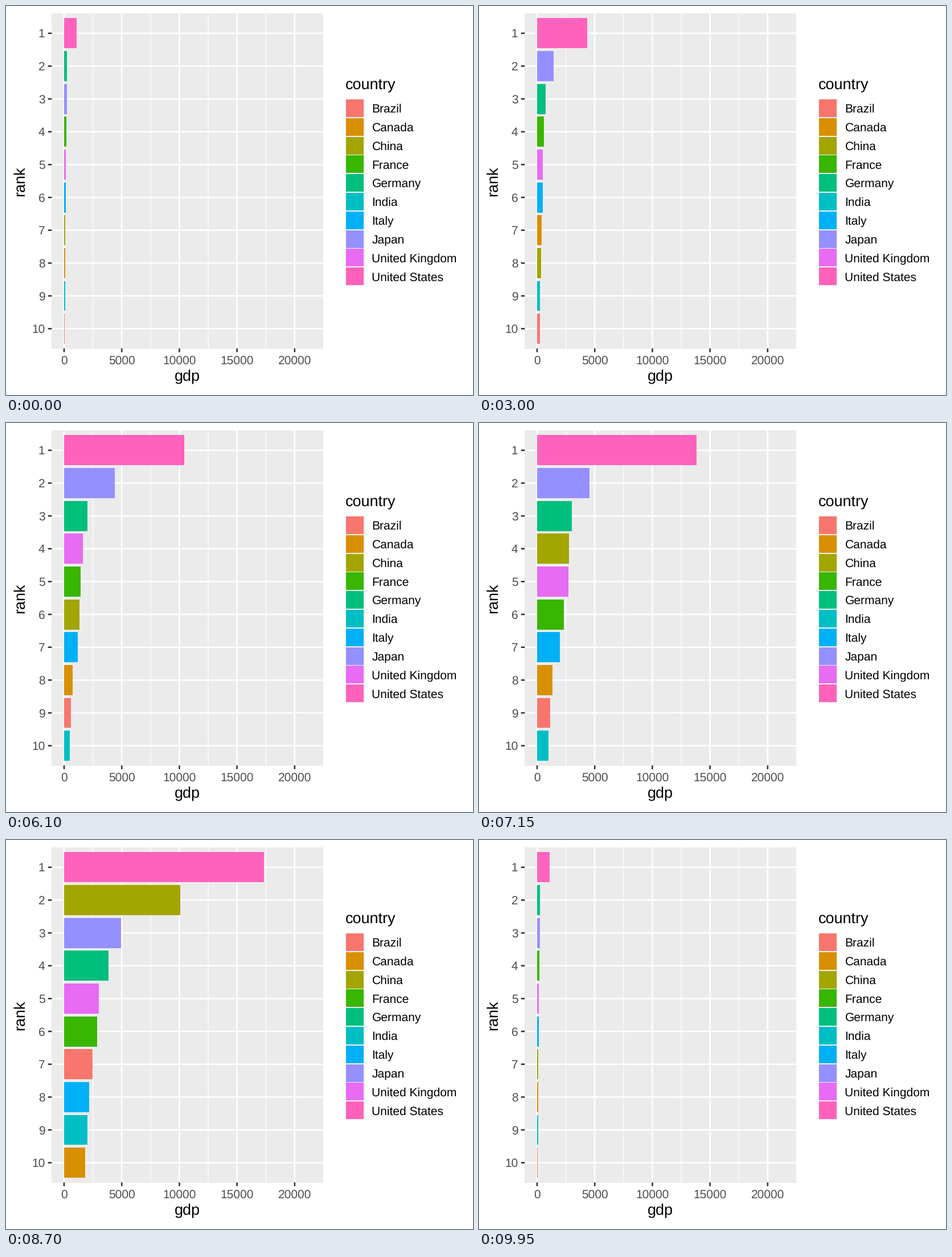
These frames come from a looping animation (820x683 px, 10 s). A matplotlib script:

```python
import matplotlib.pyplot as plt
import numpy as np
from matplotlib.animation import FuncAnimation
from matplotlib.patches import Rectangle

W, H, DPI = 820, 683, 64
YEARS, FRAMES = 50, 200
LEFT, RIGHT, TOP, BOTTOM = 80.4, 556.4, 13.3, 601.2
X0, X_SCALE = 102.03, 0.02024
ROW = (BOTTOM - TOP) / 10.2
MAJOR, MINOR, TICK = 2.58, 1.29, 6.64
TEXT, TITLE = 21.26, 26.57
KEY, KEY_X, KEY_Y, INSET = 32.8, 596.3, 163.1, 1.35

plt.rcParams["font.family"] = "Liberation Sans"
plt.rcParams["text.hinting"] = "none"
plt.rcParams["text.hinting_factor"] = 1

# Key years since the first one; growth between them is at a constant rate.
KEY_YEARS = [0, 10, 15, 20, 25, 31, 36, 40, 44, 47, 48, 49]
names, colors, series = [], [], []


def country(name, color, *billions):
    growth = np.interp(np.arange(YEARS), KEY_YEARS, np.log(billions))
    names.append(name)
    colors.append(color)
    series.append(np.exp(growth))


country("Brazil", "#F8766D", 42, 235, 223, 462, 769, 559, 1108, 2209, 2456, 2063, 1917, 1878)
country("Canada", "#D89000", 88, 274, 365, 594, 604, 739, 1319, 1617, 1806, 1650, 1725, 1742)
country("China", "#A3A500", 93, 191, 310, 361, 735, 1339, 2752, 6087, 10476, 12310, 13895, 14280)
country("France", "#39B600", 148, 701, 553, 1269, 1601, 1376, 2319, 2643, 2852, 2595, 2788, 2716)
country("Germany", "#00BF7D", 216, 950, 733, 1772, 2586, 1944, 2992, 3396, 3884, 3666, 3964, 3861)
country("India", "#00BFC4", 62, 186, 233, 321, 360, 485, 940, 1676, 2039, 2652, 2713, 2869)
country("Italy", "#00B0F6", 113, 477, 452, 1181, 1175, 1167, 1948, 2134, 2159, 1962, 2091, 2004)
country("Japan", "#9590FF", 213, 1105, 1399, 3133, 5449, 4304, 4530, 5700, 4850, 4867, 4955, 5082)
country("United Kingdom", "#E76BF3", 131, 565, 489, 1093, 1342, 1640, 2714, 2475, 3064, 2666, 2861, 2829)
country("United States", "#FF62BC", 1073, 2857, 4339, 5963, 7640, 10582, 13815, 14992, 17527, 19543, 20580, 21374)

gdp = np.array(series).T
rank = 1 + np.argsort(np.argsort(-gdp, axis=1), axis=1)


def x_at(value):
    return X0 + value * X_SCALE


def y_at(place):
    return TOP + (place - 0.4) * ROW


fig = plt.figure(figsize=(W / DPI, H / DPI), dpi=DPI, facecolor="white")
ax = fig.add_axes([0, 0, 1, 1])
ax.set_xlim(0, W)
ax.set_ylim(H, 0)
ax.axis("off")


def rect(x, y, w, h, color, z=1, smooth=False):
    return ax.add_patch(Rectangle((x, y), w, h, fc=color, ec="none", lw=0,
                                  snap=False, antialiased=smooth, zorder=z))


def hline(x1, x2, y, width, color):
    rect(x1, y - width / 2, x2 - x1, width, color, 2, True)


def vline(x, y1, y2, width, color):
    rect(x - width / 2, y1, width, y2 - y1, color, 2, True)


def label(x, y, text, size, color="black", ha="left", **kw):
    ax.text(x, y, text, fontsize=size * 72 / DPI, color=color, ha=ha,
            va="baseline", zorder=5, **kw)


# Panel, grid and axes
rect(LEFT, TOP, RIGHT - LEFT, BOTTOM - TOP, "#EBEBEB")
for v in range(2500, 20000, 5000):
    vline(x_at(v), TOP, BOTTOM, MINOR, "white")
for v in range(0, 20001, 5000):
    vline(x_at(v), TOP, BOTTOM, MAJOR, "white")
    vline(x_at(v), BOTTOM, BOTTOM + TICK, MAJOR, "#333333")
    label(x_at(v), 628.5, str(v), TEXT, "#4D4D4D", "center")
for r in range(1, 11):
    hline(LEFT, RIGHT, y_at(r), MAJOR, "white")
    hline(LEFT - TICK, LEFT, y_at(r), MAJOR, "#333333")
    label(68.5, y_at(r) + 7.6, str(r), TEXT, "#4D4D4D", "right")
label((LEFT + RIGHT) / 2, 658.5, "gdp", TITLE, ha="center")
label(32, (TOP + BOTTOM) / 2, "rank", TITLE, ha="center",
      rotation=90, rotation_mode="anchor")

# Legend
label(KEY_X, 146.5, "country", TITLE)
for i, (name, color) in enumerate(zip(names, colors)):
    y = KEY_Y + i * KEY
    rect(KEY_X, y, KEY, KEY, "#F2F2F2")
    rect(KEY_X + INSET, y + INSET, KEY - 2 * INSET, KEY - 2 * INSET, color, 2)
    label(642.5, y + KEY / 2 + 7.6, name, TEXT)

bars = [rect(X0, 0, 0, 0.9 * ROW, c, 3 + i / 100) for i, c in enumerate(colors)]


def pose(frame):
    """Year index and progress towards the next year."""
    if frame < 4:
        return 0, frame / 4
    # The first change takes a frame longer; a shorter stop halfway makes up for it.
    year, phase = divmod(frame + (frame > FRAMES // 2), 4)
    return year % YEARS, max(0, phase - 1) / 3


def draw(frame):
    year, t = pose(frame)
    after = (year + 1) % YEARS
    values = (1 - t) * gdp[year] + t * gdp[after]
    places = (1 - t) * rank[year] + t * rank[after]
    for bar, value, place in zip(bars, values, places):
        bar.set_width(value * X_SCALE)
        bar.set_y(y_at(place) - 0.45 * ROW)
    return bars


anim = FuncAnimation(fig, draw, frames=FRAMES, interval=50, repeat=True, repeat_delay=0)
plt.show()
```
